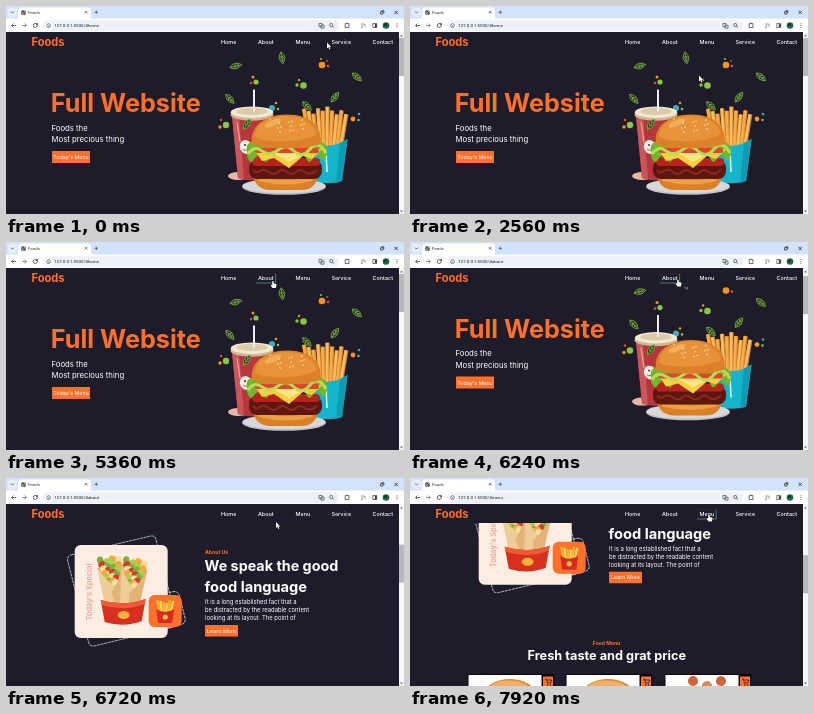
An HTML page with a canvas for the animation above (8000 ms loop, 398 px wide and 208 px high).

```html
<!DOCTYPE html>
<html lang="en">
<head>
<meta charset="utf-8">
<title>Foods</title>
<style>
html, body { margin: 0; width: 100%; height: 100%; overflow: hidden; background: #1e1c2a; }
canvas { display: block; width: 398px; height: 208px; }
</style>
</head>
<body>
<canvas id="stage"></canvas>
<script>
const W = 398, H = 208, LOOP = 8000, TICK = 80;
const ORANGE = '#ff702a', BG = '#1e1c2a', INK = '#474747';
const canvas = document.getElementById('stage');
const c = canvas.getContext('2d');
const dpr = window.devicePixelRatio || 1;
canvas.width = W * dpr;
canvas.height = H * dpr;

// drawing helpers
function fill(d, color) { c.fillStyle = color; c.fill(new Path2D(d)); }
function line(d, color, w = 1) {
  c.strokeStyle = color;
  c.lineWidth = w;
  c.stroke(new Path2D(d));
}
function rect(x, y, w, h, color, r = 0) {
  c.fillStyle = color;
  c.beginPath();
  c.roundRect(x, y, w, h, r);
  c.fill();
}
function oval(x, y, rx, ry, color, a = 0) {
  c.fillStyle = color;
  c.beginPath();
  c.ellipse(x, y, rx, ry, a, 0, 7);
  c.fill();
}
function dot(x, y, r, color) { oval(x, y, r, r, color); }
function ring(x, y, r, color, w = 0.7) {
  c.strokeStyle = color;
  c.lineWidth = w;
  c.beginPath();
  c.arc(x, y, r, 0, 7);
  c.stroke();
}
function text(s, x, y, size, color = '#fff', weight = 400, align = 'left', font = 'Inter') {
  c.font = `${weight} ${size}px ${font}, sans-serif`;
  c.fillStyle = color;
  c.textAlign = align;
  c.fillText(s, x, y);
}
function at(x, y, angle, draw) {
  c.save();
  c.translate(x, y);
  c.rotate(angle);
  draw();
  c.restore();
}

// timing
function ease(p) {
  p = Math.min(1, Math.max(0, p));
  let lo = 0, hi = 1, u = p;
  for (let i = 0; i < 20; i++) {
    const x = 3 * u * (1 - u) * (0.42 * (1 - u) + 0.58 * u) + u ** 3;
    if (x < p) lo = u; else hi = u;
    u = (lo + hi) / 2;
  }
  return u * u * (3 - 2 * u);
}
const ABOUT_AT = 6125, MENU_AT = 7656, GLIDE = 675;
function scrollAt(t) {
  return 178 * ease((t - ABOUT_AT) / GLIDE) + 152 * ease((t - MENU_AT) / GLIDE);
}
const ABOUT_Y = scrollAt(6720), MENU_Y = scrollAt(7920);

const pointerPath = [
  [0, 321, 36.5], [320, 286, 74], [2320, 286, 74], [2640, 290, 68],
  [3120, 290, 68], [3440, 298, 56], [3600, 298, 56], [4160, 304, 56],
  [4560, 304, 56], [4640, 262, 38], [4800, 263, 38], [5040, 267, 39],
  [6000, 267, 39], [6240, 268, 37.5], [6480, 270, 44], [6880, 270, 44],
  [7600, 299, 36.5], [8000, 299, 36.5]
];
function pointerAt(t) {
  const i = pointerPath.findIndex(k => k[0] > t);
  const [t0, x0, y0] = pointerPath[i - 1], [t1, x1, y1] = pointerPath[i];
  const p = (t - t0) / (t1 - t0);
  return [x0 + (x1 - x0) * p, y0 + (y1 - y0) * p];
}

// hero
function leaf(x, y, deg) {
  at(x, y, deg * Math.PI / 180, () => {
    fill('M-6 0 Q-1 -5.6 6 0 Q-1 5.6 -6 0Z', '#22301f');
    line('M-6 0 Q-1 -5.6 6 0 Q-1 5.6 -6 0Z M-6.5 .2 L4 0 M-2 0 L0 -2 M-2 0 L0 2 M1 0 L2.6 -1.4 M1 0 L2.6 1.4', '#80b541', 0.75);
  });
}
function cup() {
  oval(232, 170, 10, 4, '#e3b9a6');
  fill('M226 110 H267 L261 172 Q247 177 232 172Z', '#b5373c');
  fill('M226 110 H233 L238 174 L232 172Z', '#c9565a');
  fill('M255 111 H267 L261 172 L253 174Z', '#98262f');
  line('M231 116 L234 136', '#e9a49c', 1.2);
  oval(240, 141, 6, 7, '#f8efe6', -0.4);
  dot(239, 139, 1, '#5a2630');
  line('M237 143 Q240 146 243 142', '#b3202d', 0.8);
  oval(246, 108.8, 21.5, 6, '#cdb795');
  oval(246, 106.2, 21.2, 5.8, '#f3e8d2');
  oval(246, 105.4, 15.5, 3.6, '#dccbab');
  line('M248 83.5 V105.5', '#efeef2', 2);
}
function fries() {
  for (let i = 0; i < 10; i++) {
    const x = 298 + i * 4.7, y = 100 + (i * 7 % 5) * 1.6 + Math.abs(i - 4) * 0.7, foot = 305 + i * 3.3;
    line(`M${x} ${y} L${foot} 142`, '#d9832b', 4.2);
    line(`M${x - 0.4} ${y} L${foot - 0.5} 142`, i % 2 ? '#f3bd62' : '#f6ac48', 2.8);
  }
  fill('M300 134 Q322 146 341.5 133 L336 175 Q324 179 307 176Z', '#14b5ca');
  fill('M334 137 L341.5 133 L336 175 L330 177Z', '#0d9db3');
  line('M320 145 L321 166', '#d8f6fa', 1.6);
}
function wave(x, y, width, n, depth) {
  let d = '';
  const step = width / n;
  for (let i = 0; i < n; i++) {
    const x0 = x - i * step, end = y + (i % 2 ? 2 : -1);
    d += ` Q${x0 - step / 2} ${y + depth * (i % 2 ? -0.4 : 1)} ${x0 - step} ${end}`;
  }
  return d;
}
function burger() {
  oval(278, 180.8, 42, 8, '#bfbfc4');
  oval(278, 179.8, 41.5, 7.2, '#d8d8db');
  fill('M247 166 H312 C312 178 306 184 295 184 H265 C254 184 247 178 247 166Z', '#dc8026');
  fill('M250 170 Q280 178 309 170 L306 175 Q280 182 253 175Z', '#eda046');
  rect(243, 154, 73, 19, '#5e1611', 8);
  line('M247 164 Q250 168 254 165 T263 166 T272 166 T281 166 T290 166 T299 166 T311 164', '#8c2a1e', 2);
  rect(246, 152, 68, 8, '#b8231b', 4);
  fill('M241 145 Q239 136 249 135 H311 Q322 136 321 148' + wave(321, 151, 80, 11, 9) + 'Z', '#74b52f');
  fill('M248 143 H316 L306 153 L297 150 L283 162 L268 152 L256 155Z', '#f6d13f');
  fill('M268 147 H300 L283 156Z', '#fae583');
  rect(249, 142, 64, 5, '#e0452e', 2.5);
  line('M242 148 Q248 139 256 145 T272 144 T288 145 T304 143 T320 147', '#b9dc55', 3);
  fill('M246 138 C243 121 258 108.5 281 108.5 C305 108.5 317 122 314.5 138 C300 143.5 260 143.5 246 138Z', '#dc8129');
  fill('M249 131 C249 118 262 110 281 110 C297 110 308 117 311 128 C298 136 265 138 249 131Z', '#e8923a');
  oval(267, 117, 9, 3, '#f2ae5a', -0.4);
  for (let i = 0; i < 14; i++) {
    oval(264 + i * 23 % 35, 113 + i * 11 % 14, 1.1, 0.6, '#fce6b4', i % 3 - 1);
  }
}
function hero() {
  text('Full Website', 44.8, 106, 25.2, ORANGE, 700);
  text('Foods the', 45.5, 124.5, 7.75);
  text('Most precious thing', 45.5, 136, 7.75);
  rect(46, 145, 38, 12, ORANGE);
  text("Today's Menu", 65, 153, 5.3, '#fff', 400, 'center');
  leaf(230, 60, -14); leaf(276, 52, 82); leaf(351, 71, 40); leaf(224, 93, 48);
  leaf(329, 91, -52); leaf(301, 100, 45);
  const green = '#8cc63f', amber = '#f7931e', red = '#e8502a', blue = '#45a9b5';
  for (const [x, y, r, col] of [
    [316, 59, 3.3, amber], [322, 60, 1.3, red], [315, 53, 1, green], [321, 55, 0.8, amber],
    [250, 76, 2.6, green], [245, 77, 1.3, red], [247, 71, 1.5, amber],
    [297.5, 79.5, 3.3, green], [291, 79, 1.7, green], [293, 74, 1.2, amber],
    [266, 102, 3.1, blue], [270, 97, 1.3, amber], [272, 103, 1.3, green],
    [220, 119, 3.2, green], [214, 121, 1.7, amber], [215, 114, 1.2, red],
    [347, 113, 2.4, amber], [353, 108, 1.3, blue], [352.5, 114, 1.2, green]
  ]) dot(x, y, r, col);
  cup();
  leaf(241, 118, -55);
  fries();
  burger();
}

// about
function fryBox(x, y) {
  for (let i = 0; i < 6; i++) {
    line(`M${x - 8 + i * 3.2} ${y - 11 + i * 5 % 4} L${x - 5 + i * 2} ${y + 4}`, i % 2 ? '#ffd65c' : '#f5b52e', 2.3);
  }
  fill(`M${x - 9} ${y - 2} Q${x} ${y + 4} ${x + 9} ${y - 2} L${x + 7} ${y + 12} H${x - 7}Z`, '#d92a20');
  dot(x, y + 6, 2.6, '#f6c844');
}
function wrap(x, y, a) {
  at(x, y, a, () => {
    fill('M-13 -20 H13 L9 24 H-9Z', '#dba967');
    for (let i = 0; i < 24; i++) {
      const row = i >> 2, spread = 10 - row * 1.4;
      oval((i % 4 - 1.5) * spread / 1.6, -27 + row * 4.4 + i % 2 * 2, 3.2, 3.8,
        ['#7bb13a', '#f4a83a', '#d8382a', '#a9cf55', '#f7dfa4'][i * 3 % 5], i);
    }
    fill('M-13 -20 Q-7 -8 1 0 L4 24 H-9Z', '#efcd98');
    fill('M13 -20 Q8 -6 -2 6 L2 24 H9Z', '#e2b577');
  });
}
function dashed(d) {
  c.setLineDash([3, 0.7]);
  line(d, '#e4e2e6', 0.75);
  c.setLineDash([]);
}
function specials() {
  dashed('M65 76.8 L143 58.2 Q148 57 149.2 61 L170 143 Q171 148 166 149.2 L88 167.8 Q83 169 81.8 164 L61 83 Q60 78 65 76.8Z');
  rect(68, 67, 93, 93, '#fdede3', 6);
  at(85, 142.5, -Math.PI / 2, () => text("Today's Special", 0, 0, 7.4, '#eab0a0', 700));
  wrap(106, 108, -0.12);
  wrap(125, 110, 0.14);
  fill('M94 122 Q117 129 139 121 L135 143 Q117 150 98 144Z', '#d8301f');
  fill('M94 122 Q117 129 139 121 L138 126 Q117 134 95 127Z', '#ef5a35');
  oval(117, 137, 6, 4, '#f6b23c');
  at(159, 133, -0.25, () => dashed('M-11 -17 H11 Q17 -17 17 -11 V11 Q17 17 11 17 H-11 Q-17 17 -17 11 V-11 Q-17 -17 -11 -17Z'));
  rect(142, 117, 33, 32, ORANGE, 6);
  fryBox(158.5, 133);
}
function about() {
  at(0.7, 0, 0, specials);
  text('About Us', 199, 76.3, 5.15, ORANGE, 700);
  text('We speak the good', 198.5, 93.3, 14.35, '#fff', 700);
  text('food language', 198.5, 114, 14.65, '#fff', 700);
  ['It is a long established fact that a', 'be distracted by the readable content', 'looking at its layout. The point of']
    .forEach((s, i) => text(s, 199, 125.8 + i * 8.2, 5.9));
  rect(199, 147, 33, 11.5, ORANGE);
  text('Learn More', 215.5, 154.7, 5.3, '#fff', 400, 'center');
}

// menu
function menu() {
  text('Food Menu', 196.5, 167.3, 5.05, ORANGE, 700, 'center');
  text('Fresh taste and grat price', 196.8, 182, 12.75, '#fff', 700, 'center');
  [58, 156, 255].forEach((x, i) => {
    rect(x - 0.5, 196, 87, 80, '#050408');
    rect(x + 0.5, 197, 85, 80, '#fff');
    if (i < 2) {
      oval(x + 42, 217, 26, 16, '#dc8a3a');
      oval(x + 41, 211, 20, 8.5, '#f0b066');
    } else {
      for (let k = 0; k < 3; k++) oval(x + 28 + k * 14, 203 + k % 2 * 5, 5, 5, k % 2 ? '#e08a55' : '#d3633a', k);
      rect(x + 22, 211, 44, 30, '#e8a05a', 6);
    }
    rect(x + 73.5, 197, 12.5, 13, '#050408');
    rect(x + 75, 198.5, 10, 11.5, ORANGE);
    line(`M${x + 77} 201 h1.4 l1 4 h3.4 l.8 -3 h-4.6`, '#241a1a', 0.8);
    dot(x + 79.7, 207, 0.7, '#241a1a');
    dot(x + 82.5, 207, 0.7, '#241a1a');
  });
}

// header and browser
const links = [['Home', 215], ['About', 252], ['Menu', 289.5], ['Service', 325.4], ['Contact', 366.5]];
function header(px, py) {
  rect(0, 26, 393, 19, BG);
  text('Foods', 25.5, 40, 11.1, ORANGE, 700);
  let over = false;
  for (const [name, x] of links) {
    text(name, x, 38.4, 5.45, '#fff', 500);
    const r = x + c.measureText(name).width + 2;
    if (px > x - 2 && px < r && py > 31 && py < 41.5) {
      over = true;
      line(`M${x - 2} 41 V31.8 H${r}`, '#2b363f', 0.5);
      line(`M${x - 2} 41 H${r} V31.8`, '#5f8c92', 0.8);
    }
  }
  return over;
}
function browser(url, scroll) {
  rect(0, 0, W, 13, '#d3e3fd');
  rect(0, 12.5, W, 13.5, '#fff');
  rect(2, 2, 9, 9, '#e6effd', 3);
  line('M5 5.6 L6.5 7.1 L8 5.6', INK, 0.8);
  rect(12, 1.5, 73, 14, '#fff', 4);
  dot(17.5, 6.5, 2.6, '#5f6368');
  line('M15.5 6 Q17 7 17.2 8.5 M18 4.5 L19.5 6.5', '#fff', 0.7);
  text('Foods', 22, 8.2, 4.3, '#2b2b2b', 400, 'left', 'Roboto');
  line('M78.8 5 l2.6 2.6 m0 -2.6 l-2.6 2.6 M88.6 6.3 h3.4 m-1.7 -1.7 v3.4', INK, 0.7);
  line('M388.6 4.8 l3.2 3.2 m0 -3.2 l-3.2 3.2', '#222', 0.8);
  line('M374.6 5.6 h2.4 v2.4 h-2.4z M375.6 4.7 h2.3 v2.3', '#222', 0.7);
  line('M10 19.5 H5.6 m2 -2 l-2 2 l2 2', INK, 0.8);
  line('M16 19.5 H20.4 m-2 -2 l2 2 l-2 2', '#777', 0.8);
  ring(29.2, 19.5, 2, INK, 0.8);
  dot(31.2, 18, 0.9, INK);
  rect(37, 14.3, 296, 10.6, '#edf2fa', 5.3);
  dot(42.5, 19.6, 3.6, '#fff');
  ring(42.5, 19.6, 1.9, INK);
  line('M42.5 19.2 v1.4', INK, 0.6);
  text(url, 48.2, 21.3, 4.4, '#222', 400, 'left', 'Roboto');
  line('M313 17.5 h3 v3.2 h-3z M315 19 h3 v3.2 h-3z', '#55606e', 0.8);
  ring(325.2, 19, 1.6, INK);
  line('M326.4 20.2 l1.5 1.5', INK, 0.8);
  line('M339.2 17.6 h3.8 v4 h-3.8z M341 17.3 v-.8', INK, 0.8);
  line('M355 18 h4 M355 19.8 h2.5 M355 21.5 h2 M359 18 v3', '#666', 0.6);
  rect(366.5, 17.2, 4.6, 4.6, INK, 0.6);
  rect(367.2, 17.9, 1.6, 3.2, '#fff');
  dot(380, 19.5, 3.3, '#1f6b43');
  dot(379.5, 18.8, 1.5, '#123d2b');
  for (let i = -1; i < 2; i++) dot(391, 19.5 + i * 1.8, 0.55, INK);

  rect(393, 26, 5, 182, '#f8f8f8');
  rect(393, 32 + scroll / 5, 5, 38, '#b9b9b9');
  fill('M394 30.5 h3 l-1.5 -2z', '#777');
  fill('M394 204.5 h3 l-1.5 2z', '#777');
}
function pointer(x, y, hand) {
  at(x, y, 0, () => {
    const d = hand
      ? 'M-.8 .4 Q0 -.4 .7 .4 V2.5 L3 3.1 Q3.8 3.5 3.5 4.6 L2.8 7 H-.5 L-2.4 4.2 Q-2.1 3.2 -.8 4Z'
      : 'M0 0 V6 L1.4 4.8 L2.4 7 L3.4 6.5 L2.4 4.4 H4.3Z';
    line(d, '#111', 1);
    fill(d, '#fff');
  });
}

function draw(t) {
  c.setTransform(dpr, 0, 0, dpr, 0, 0);
  rect(0, 0, W, H, BG);
  const scroll = scrollAt(t), [px, py] = pointerAt(t);
  for (const [section, origin] of [[hero, 0], [about, ABOUT_Y], [menu, MENU_Y]]) {
    at(0, origin - scroll, 0, section);
  }
  const over = header(px, py);
  const page = t >= MENU_AT ? 'menu' : t >= ABOUT_AT ? 'about' : 'home';
  browser('127.0.0.1:5500/#' + page, scroll);
  pointer(px, py, over);
}

const start = performance.now();
function tick() {
  const t = (performance.now() - start) % LOOP;
  draw(Math.floor(t / TICK) * TICK);
  requestAnimationFrame(tick);
}
tick();
</script>
</body>
</html>
```
